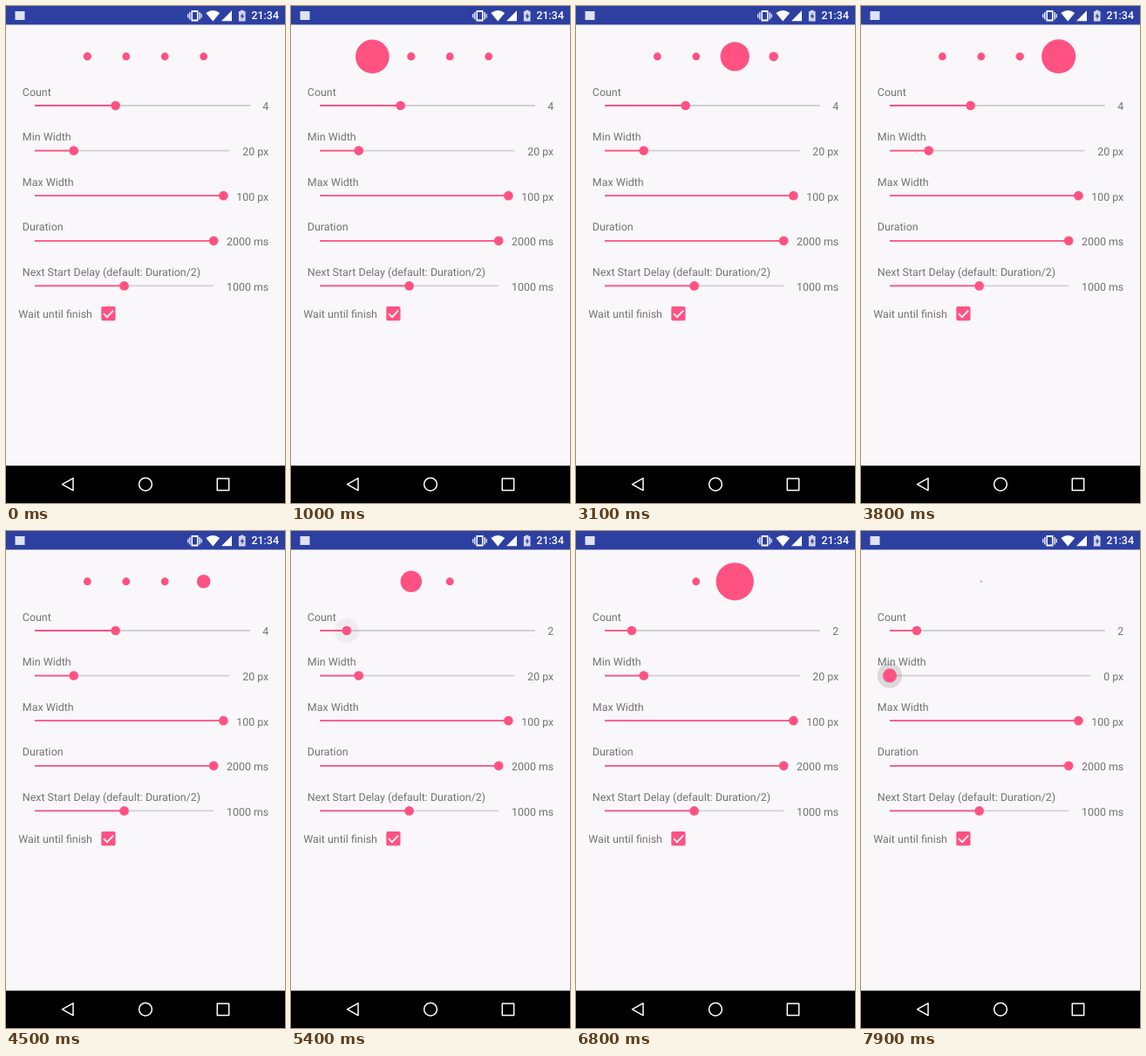
An HTML page that plays this animation: 320x569 px, repeating every 8000 ms.

```html
<!DOCTYPE html>
<html lang="en">
<head>
<meta charset="utf-8">
<title>Growing dots settings</title>
<style>
  html, body { margin: 0; width: 100%; height: 100%; overflow: hidden; background: #faf7fb; }
  svg { display: block; width: 320px; height: 569px; }
  text { font: 12.44px Roboto, sans-serif; fill: #757275; text-rendering: geometricPrecision; }
  .value { text-anchor: end; }
  .clock { font-weight: 500; fill: #fff; }
  .pink { fill: #ff5282; }
  .track { stroke: #d3d0d4; stroke-width: 1.8; }
  .fill { stroke: #ff5282; stroke-width: 1.8; }
  .nav { fill: none; stroke: #fff; stroke-width: 1.5; stroke-linejoin: round; }
</style>
</head>
<body>
<svg id="stage" viewBox="0 0 320 569">
  <rect width="320" height="569" fill="#faf7fb"/>
  <rect width="320" height="21.4" fill="#2d40a2"/>
  <rect x="10.5" y="6" width="11" height="10" fill="#dfe2f2"/>

  <g fill="#fff">
    <path d="M212.5 5h8v12.4h-8zM214 7v8.4h5V7z" fill-rule="evenodd"/>
    <path d="M210.2 7h1.3v8.4h-1.3zM208.2 9h1.2v4.4h-1.2zM221.5 7h1.3v8.4h-1.3zM223.6 9h1.2v4.4h-1.2z"/>
    <path d="M229.4 8Q237.3 2 245.2 8L237.3 17.6z"/>
    <path d="M247 17.3h12V5.2z"/>
    <path d="M269 4.8h3.6v1.3h2v11.3h-7.7V6.1h2z" opacity=".78"/>
  </g>
  <path d="M271.5 8L268.7 12.3h1.8v3.2L273.2 11h-1.7z" fill="#2d40a2"/>
  <text class="clock" x="313" y="15.4" text-anchor="end">21:34</text>

  <g id="dots" class="pink"></g>
  <g id="rows"></g>

  <text x="14.2" y="356.8">Wait until finish</text>
  <rect class="pink" x="109.3" y="344" width="16.2" height="16.2" rx="1.8"/>
  <path d="M112 352.2l3.9 3.9 7.2-7.5" fill="none" stroke="#fff" stroke-width="1.8"/>

  <rect y="526.3" width="320" height="43"/>
  <g class="nav">
    <path d="M64.5 547.6L77 540.6v14z"/>
    <circle cx="160" cy="547.6" r="7.4"/>
    <rect x="242.3" y="541" width="13.4" height="13.4"/>
  </g>
</svg>
<script>
const LOOP = 8000, DURATION = 2000, DELAY = 1000;
const SCALE = 320 / 720, MAX_WIDTH = 100;
const LEFT = 33, THUMB = 5.33, THUMB_PRESSED = 8;

// A new run of the dots begins at each start
const countSteps = [
  { at: 0, start: -103, count: 4 },
  { at: 4680, start: 4680, count: 3 },
  { at: 4780, start: 4780, count: 2 }
];
const minDrag = { from: 7420, to: 7710 };
const presses = {
  count: { from: 4560, to: 5130 },
  min: { from: 7340, to: 9000 }
};

const clamp = v => Math.max(0, Math.min(1, v));
const mix = (a, b, k) => a + (b - a) * k;

function add(parent, tag, attrs, text = '') {
  const node = document.createElementNS('http://www.w3.org/2000/svg', tag);
  for (const key in attrs) node.setAttribute(key, attrs[key]);
  node.textContent = text;
  parent.append(node);
  return node;
}

function set(node, attrs) {
  for (const key in attrs) node.setAttribute(key, attrs[key]);
}

const dotLayer = document.getElementById('dots');
const dots = Array.from({ length: 4 }, () => add(dotLayer, 'circle', { cy: 57.8 }));

function makeRow(label, index) {
  const y = 114 + index * 51.6;
  const rows = document.getElementById('rows');
  const line = cls => add(rows, 'line', { class: cls, x1: LEFT, y1: y, y2: y });
  add(rows, 'text', { x: 18.8, y: y - 11.4 }, label);
  return {
    value: add(rows, 'text', { class: 'value', x: 301.3, y: y + 5.4 }),
    track: line('track'),
    fill: line('fill'),
    ripple: add(rows, 'circle', { cy: y, r: 0 }),
    thumb: add(rows, 'circle', { class: 'pink', cy: y, r: THUMB })
  };
}

const [countRow, minRow, maxRow, durationRow, delayRow] =
  ['Count', 'Min Width', 'Max Width', 'Duration', 'Next Start Delay (default: Duration/2)'].map(makeRow);

function showRow(row, text, share, right) {
  const x = mix(LEFT, right, share);
  row.value.textContent = text;
  set(row.track, { x2: right });
  set(row.fill, { x2: x });
  set(row.ripple, { cx: x });
  set(row.thumb, { cx: x });
}

function showPress(row, press, t) {
  const down = clamp((t - press.from) / 200);
  const up = clamp((t - press.to) / 200);
  const fade = clamp((t - press.to) / 400);
  set(row.thumb, { r: mix(THUMB, THUMB_PRESSED, down * (1 - up)) });
  set(row.ripple, { r: 14.2 * down, opacity: 0.12 * down * (1 - fade) });
}

// Out and back under one ease-in-out curve
function growth(u) {
  const eased = 0.5 - Math.cos(Math.PI * clamp(u)) / 2;
  return 1 - Math.abs(2 * eased - 1);
}

function draw(t) {
  const step = countSteps.filter(s => t >= s.at).pop();
  const minWidth = Math.round(mix(20, 0, clamp((t - minDrag.from) / (minDrag.to - minDrag.from))));
  const dragging = t >= minDrag.from && t < minDrag.to;
  const start = t >= minDrag.to ? minDrag.to : step.start;

  dots.forEach((dot, i) => {
    const grown = dragging ? 0 : growth((t - start - i * DELAY) / DURATION);
    const cx = 160 + (i - (step.count - 1) / 2) * MAX_WIDTH * SCALE;
    const width = i < step.count ? mix(minWidth, MAX_WIDTH, grown) : 0;
    set(dot, { cx, r: width * SCALE / 2 });
  });

  showRow(countRow, step.count, (step.count - 1) / 8, 280);
  showRow(minRow, minWidth + ' px', minWidth / 100, minWidth < 10 ? 263.5 : 256.5);
  showPress(countRow, presses.count, t);
  showPress(minRow, presses.min, t);
}

showRow(maxRow, '100 px', 1, 249.4);
showRow(durationRow, '2000 ms', 1, 238.2);
showRow(delayRow, '1000 ms', 0.5, 238.2);

const begin = performance.now();
function tick() {
  draw((performance.now() - begin) % LOOP);
  requestAnimationFrame(tick);
}
tick();
</script>
</body>
</html>
```
